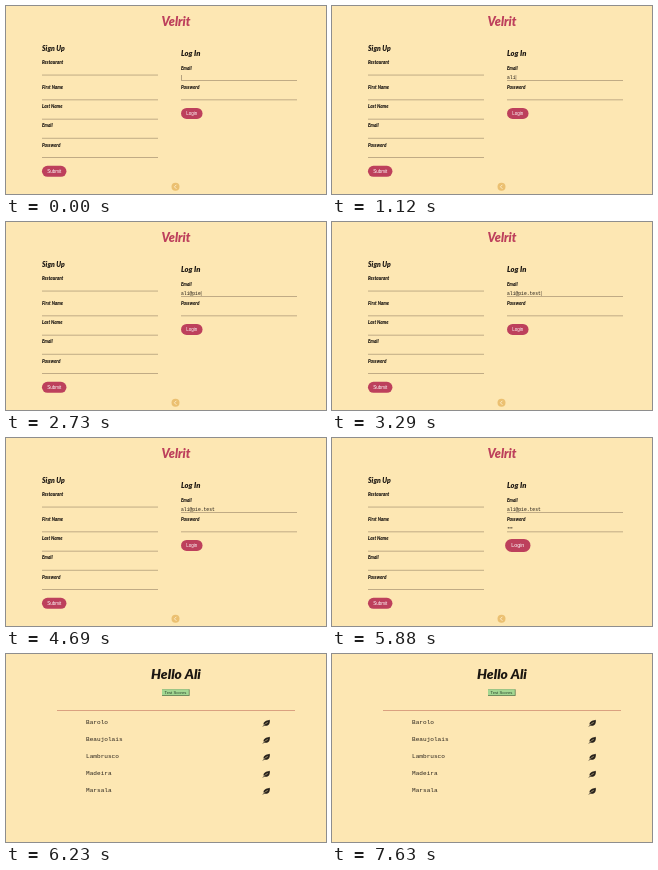
Write an HTML page with a canvas that moves like this. It is 320 px wide and 188 px high and loops after 7.7 s.

```html
<!DOCTYPE html>
<html lang="en">
<head>
<meta charset="utf-8">
<title>Sign in</title>
<style>
  html, body { margin: 0; width: 100%; height: 100%; overflow: hidden; background: #fde7b3; }
  canvas { display: block; width: 320px; height: 188px; }
</style>
</head>
<body>
<canvas id="stage"></canvas>
<script>
const LOOP = 7700;
const PAPER = '#fde7b3', INK = '#1c1712', ROSE = '#bd405c', RULE = '#b9a580', CARET = '#85765c';
const SCRIPT = 'Lato, sans-serif', TYPE = '"Liberation Mono", monospace';
const SANS = '"Liberation Sans", sans-serif';
const EMAIL = 'ali@pie.test';
// Time of each keystroke
const EMAIL_KEYS = [560, 770, 980, 1470, 2030, 2100, 2170, 2870, 2940, 3010, 3150, 3290];
const PASS_KEYS = [4760, 4900, 5040];
const WINES = ['Barolo', 'Beaujolais', 'Lambrusco', 'Madeira', 'Marsala'];

const canvas = document.getElementById('stage');
const ctx = canvas.getContext('2d');
const dpr = window.devicePixelRatio || 1;
canvas.width = 320 * dpr;
canvas.height = 188 * dpr;

const typed = (keys, t) => keys.filter(k => k <= t).length;
const between = (t, a, b) => t >= a && t < b;

function text(str, x, y, font, color = INK, align = 'left') {
  ctx.font = font;
  ctx.fillStyle = color;
  ctx.textAlign = align;
  ctx.fillText(str, x, y);
  return ctx.measureText(str).width;
}

const script = (str, x, y, size, color, align) =>
  text(str, x, y, `italic 900 ${size}px ${SCRIPT}`, color, align);

function rect(x, y, w, h, color) {
  ctx.fillStyle = color;
  ctx.fillRect(x, y, w, h);
}

function disc(x, y, r, color) {
  ctx.fillStyle = color;
  ctx.beginPath();
  ctx.arc(x, y, r, 0, Math.PI * 2);
  ctx.fill();
}

function scaled(x, y, s, draw) {
  ctx.save();
  ctx.translate(x, y);
  ctx.scale(s, s);
  draw();
  ctx.restore();
}

function field(label, x, y, line) {
  script(label, x, y, 4.5);
  rect(x, line, 116, 0.9, RULE);
}

function pill(label, x, y, w, s = 1) {
  scaled(x, y, s, () => {
    ctx.fillStyle = ROSE;
    ctx.beginPath();
    ctx.roundRect(-w / 2, -5.5, w, 11, 5.5);
    ctx.fill();
    text(label, 0, 1.5, `4.5px ${SANS}`, '#fff', 'center');
  });
}

function backButton() {
  disc(169.5, 180.8, 4, '#ebc071');
  ctx.strokeStyle = '#fff0cf';
  ctx.lineWidth = 0.9;
  ctx.beginPath();
  ctx.moveTo(170.4, 178.8);
  ctx.lineTo(168.4, 180.8);
  ctx.lineTo(170.4, 182.8);
  ctx.stroke();
}

function formPage(t) {
  script('Velrit', 170, 19.5, 12.4, ROSE, 'center');

  script('Sign Up', 36, 44.5, 6.9);
  field('Restaurant', 36, 58, 68.6);
  field('First Name', 36, 82.5, 93.4);
  field('Last Name', 36, 102, 112.7);
  field('Email', 36, 121, 131.8);
  field('Password', 36, 140.5, 151);
  pill('Submit', 48.2, 165.3, 24.5);

  script('Log In', 175, 49.5, 7.6);
  field('Email', 175, 63.5, 74);
  field('Password', 175, 82.5, 93.4);

  const w = text(EMAIL.slice(0, typed(EMAIL_KEYS, t)), 175, 72.8, `4.7px ${TYPE}`);
  if (t < 4130 && !between(t, 2450, 2730) && !between(t, 3850, 4130))
    rect(175.2 + w, 69, 0.6, 5, CARET);

  const dots = typed(PASS_KEYS, t);
  for (let i = 0; i < dots; i++) disc(176.3 + i * 1.75, 89.8, 0.65, INK);
  if (between(t, 4130, 4690) || between(t, 4760, 5110))
    rect(175.2 + dots * 1.75, 88, 0.6, 5, CARET);

  const grow = Math.min(1, Math.max(0, (t - 5530) / 140));
  pill('Login', 185.8, 107.4, 21.5, 1 + 0.18 * grow);
  backButton();
}

function leaf(x, y) {
  scaled(x, y, 1, () => {
    ctx.fillStyle = '#29231c';
    ctx.beginPath();
    ctx.moveTo(3.4, -3.4);
    ctx.bezierCurveTo(4.2, 0.5, 2, 3.7, -2.2, 2.3);
    ctx.bezierCurveTo(-4.2, -1.2, -0.5, -2.3, 3.4, -3.4);
    ctx.fill();
    ctx.lineWidth = 0.7;
    ctx.strokeStyle = '#29231c';
    ctx.beginPath();
    ctx.moveTo(-3.4, 3.5);
    ctx.lineTo(-1.8, 1.6);
    ctx.stroke();
    ctx.lineWidth = 0.5;
    ctx.strokeStyle = PAPER;
    ctx.beginPath();
    ctx.moveTo(-2, 1.8);
    ctx.quadraticCurveTo(-0.8, 0, 1.5, -0.6);
    ctx.stroke();
  });
}

function listPage(t) {
  script('Hello Ali', 170, 25, 13.8, INK, 'center');

  rect(156, 35.3, 27.6, 6.6, '#5d7a50');
  rect(156, 35.3, 26.8, 5.8, '#a3d792');
  text('Test Scores', 169.5, 39.9, `4.2px ${SANS}`, '#26402a', 'center');
  rect(51, 56, 238, 0.9, '#d69a7b');
  if (t < 6230) return;

  WINES.forEach((name, i) => {
    const y = 69.7 + i * 17;
    const hover = i === 0 && between(t, 7280, 7630);
    scaled(91, y - 2, hover ? 1.2 : 1, () =>
      text(name, -11, 2, `6.1px ${TYPE}`, '#29231c'));
    leaf(260.3, y - 0.6);
  });
}

function frame(now) {
  const t = now % LOOP;
  ctx.setTransform(dpr, 0, 0, dpr, 0, 0);
  rect(0, 0, 320, 188, PAPER);
  (t < 6160 ? formPage : listPage)(t);
  requestAnimationFrame(frame);
}
requestAnimationFrame(frame);
</script>
</body>
</html>
```
